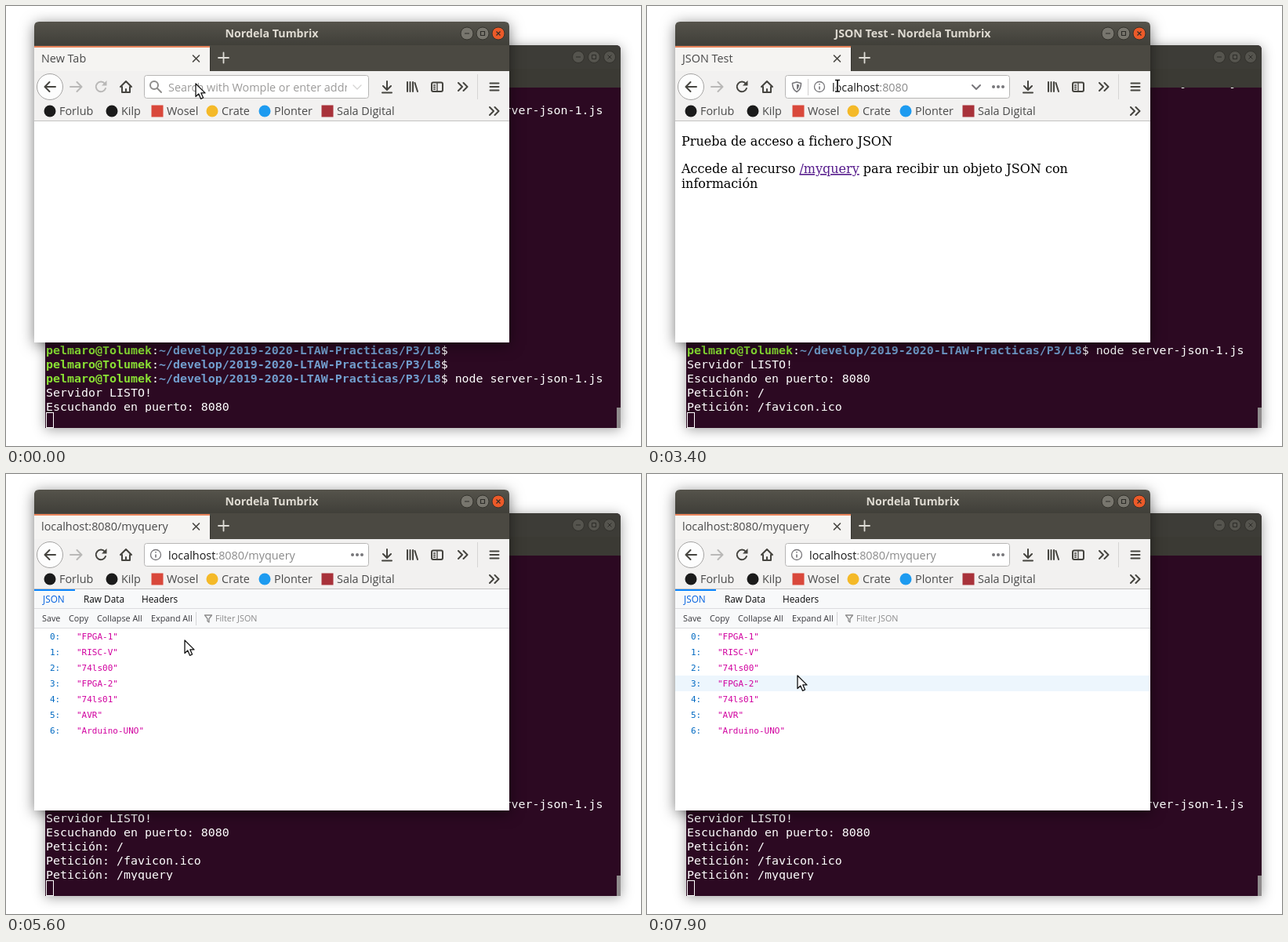
An HTML page for the animation above (8 s loop, 810 by 561 pixels).

```html
<!DOCTYPE html>
<html lang="es">
<head>
<meta charset="utf-8">
<title>JSON Test</title>
<style>
html, body { margin: 0; width: 100%; height: 100%; overflow: hidden; background: #fff; }
svg { display: block; width: 810px; height: 561px; }
text { white-space: pre; }
.ui { font: 14.4px "Open Sans", "Noto Sans", sans-serif; fill: #4a4a4a; }
.title { font: bold 14.2px "Open Sans", "Noto Sans", sans-serif; fill: #dfdbd2; text-anchor: middle; }
.term { font: 14.95px "DejaVu Sans Mono", monospace; fill: #fff; }
.user { font-weight: bold; fill: #8ae234; }
.path { font-weight: bold; fill: #729fcf; }
.page { font: 16px "DejaVu Serif", serif; fill: #000; }
.tabs { font: 11.8px "Open Sans", "Noto Sans", sans-serif; fill: #0c0c0d; }
.bar { font: 10.8px "Open Sans", "Noto Sans", sans-serif; fill: #38383d; }
.tree { font: 11px "DejaVu Sans Mono", monospace; }
.dim { fill: #8a8a8a; }
.dark { fill: #1a1a1a; }
.ic { fill: none; stroke: #45443f; stroke-width: 2; stroke-linecap: round; stroke-linejoin: round; }
.off { stroke: #b9b8b7; }
.thin { stroke-width: 1.3; }
</style>
</head>
<body>
<svg viewBox="0 0 810 561" xmlns="http://www.w3.org/2000/svg">
<defs>
  <linearGradient id="head" x2="0" y2="1">
    <stop offset="0" stop-color="#55534b"/><stop offset="1" stop-color="#403f39"/>
  </linearGradient>
  <linearGradient id="fade" x2="0" y2="1">
    <stop offset="0" stop-opacity=".22"/><stop offset="1" stop-opacity="0"/>
  </linearGradient>
  <clipPath id="termClip"><rect x="50" y="104" width="729" height="414"/></clipPath>
  <clipPath id="urlClip"><rect x="207" y="90" width="228" height="27"/></clipPath>
</defs>

<!-- terminal window -->
<path d="M50 538V56q0-6 6-6H778q6 0 6 6V538z" fill="#2c0922" style="filter:drop-shadow(0 2px 8px rgba(0,0,0,.38))"/>
<path d="M50 104V56q0-6 6-6H778q6 0 6 6V104z" fill="#3d3c37"/>
<rect x="50" y="80" width="734" height="24" fill="#3b3a34"/>
<g fill="#55544e" stroke="#33322d"><circle cx="730" cy="65" r="7.5"/><circle cx="750" cy="65" r="7.5"/><circle cx="770" cy="65" r="7.5"/></g>
<path d="M727 65h6M747.500 62.500h5v5h-5zM767.500 62.500l5 5m0-5l-5 5" fill="none" stroke="#2d2c28"/>
<g clip-path="url(#termClip)"><g id="lines" class="term"></g></g>
<rect x="51.500" y="518.500" width="9" height="19" fill="none" stroke="#fff"/>
<rect x="779" y="512" width="5" height="26" fill="#8f8b8c"/>

<!-- browser window -->
<path d="M36 429V26q0-6 6-6H636q6 0 6 6V429z" fill="#fff" style="filter:drop-shadow(0 3px 9px rgba(0,0,0,.5))"/>
<path d="M36 50V26q0-6 6-6H636q6 0 6 6V50z" fill="url(#head)"/>
<rect x="36" y="50" width="606" height="33" fill="#4b4942"/>
<rect x="36" y="83" width="606" height="63" fill="#f2f1f0"/>
<rect x="36" y="51" width="224" height="32" fill="#f5f4f2"/>
<rect x="36" y="51" width="224" height="2" fill="#e9855c"/>
<path d="M260.500 53V83" stroke="#34332e"/>
<path d="M36 146.500H642" stroke="#c3c2c1"/>
<g fill="#78766e" stroke="#34332d"><circle cx="588" cy="35" r="8"/><circle cx="608" cy="35" r="8"/><circle cx="628" cy="35" r="8" fill="#ec5a29"/></g>
<path d="M585 35h6M605.500 32.500h5v5h-5zM625.500 32.500l5 5m0-5l-5 5" fill="none" stroke="#2d2c28" stroke-width="1.2"/>
<text class="title" x="339" y="40" data-on="0-2500 5200-8000">Nordela Tumbrix</text>
<text class="title" x="339" y="40" data-on="2500-5200">JSON Test - Nordela Tumbrix</text>

<g class="ui">
  <text x="45" y="72" data-on="0-2500">New Tab</text>
  <text x="45" y="72" data-on="2500-5200">JSON Test</text>
  <g data-on="5200-5300"><circle cx="47" cy="67" r="2" fill="#77767a"/><text x="67" y="72">JSON Test</text></g>
  <text x="45" y="72" data-on="5300-8000">localhost:8080/myquery</text>
</g>
<path class="ic" style="stroke-width:1.6" d="M238.500 63l8 8m0-8l-8 8"/>
<path class="ic" style="stroke:#dedcd6;stroke-width:1.8" d="M271 66h13M277.500 59.500v13"/>

<!-- navigation bar -->
<circle cx="56" cy="103" r="16.500" fill="#fdfdfd" stroke="#a5a4a3"/>
<path class="ic" d="M63 103H50M55.500 97l-6 6 6 6"/>
<path class="ic off" d="M82 103h14M90.500 97l6 6-6 6"/>
<g id="reload"><path class="ic" d="M126 99A6.300 6.300 0 1 0 127 105"/><path d="M128.500 95v6.500h-6.500z"/></g>
<path class="ic" d="M146 103l7-7 7 7M148 103v7h10v-7M153 110v-4"/>
<rect id="box" x="176.500" y="88.500" width="286" height="29" rx="3" fill="#fff"/>
<g data-on="0-2400">
  <circle class="ic" cx="189" cy="101" r="5" style="stroke:#8d8c8a"/><path class="ic" d="M193 105l5 5" style="stroke:#8d8c8a"/>
</g>
<g class="ui">
  <text class="dim" x="207" y="109" clip-path="url(#urlClip)" style="fill:#9c9b9a" data-on="0-1300">Search with Womple or enter address</text>
  <g data-on="1300-2400">
    <rect x="210.500" y="95" width="99.500" height="17" fill="#ef8559"/>
    <text class="dark" x="207" y="109">l<tspan fill="#fff">ocalhost:8080/</tspan></text>
    <path class="ic" style="stroke:#77767a;stroke-width:1.6" d="M441 103h14M449.500 97.500l5.500 5.500-5.500 5.500"/>
  </g>
  <text class="dark" x="236" y="109" data-on="2400-5300">localhost<tspan class="dim">:8080</tspan></text>
  <text class="dark" x="207" y="109" data-on="5300-8000">localhost<tspan class="dim">:8080/myquery</tspan></text>
</g>
<path class="ic thin" style="stroke:#d5d4d3" d="M443 101l5 5 5-5" data-on="0-400"/>
<path class="ic thin" style="stroke:#77767a" d="M443 101l5 5 5-5" data-on="400-1300"/>
<path class="ic" style="stroke:#77767a" d="M415 101l5 5 5-5" data-on="2400-3600"/>
<g fill="#77767a" data-on="2400-8000"><circle cx="442" cy="103" r="2"/><circle cx="448" cy="103" r="2"/><circle cx="454" cy="103" r="2"/></g>
<g data-on="2400-5300">
  <path class="ic" style="stroke:#77767a;stroke-width:1.6" d="M191 97l5.500 1.500c0 6-2 9-5.500 11-3.500-2-5.500-5-5.500-11z"/>
  <path d="M191 99.500v7.500c2-1.500 3-3.500 3.200-6.500z" fill="#77767a"/>
  <path d="M205.500 93V114" stroke="#d0cfce"/>
</g>
<g id="info"><circle class="ic thin" cx="220" cy="103" r="6.500" style="stroke:#77767a"/><path d="M220 102.500v4M220 99v1.500" stroke="#77767a" stroke-width="1.600"/></g>
<path class="ic" d="M486 96v10M481 102l5 5 5-5M480 110.500h12M512 97v12M515.500 97v12M519 97v12M521.500 98l3.500 11M577 98l5 5-5 5M583.500 98l5 5-5 5M617.500 98.500h11M617.500 103h11M617.500 107.500h11M617 129l5 5-5 5M623.500 129l5 5-5 5" stroke-width="1.800"/>
<rect class="ic" x="543" y="97.500" width="14" height="11.500" rx="2"/>
<path class="ic thin" d="M550 98v11M545.500 101h2M545.500 103.500h2M545.500 106h2"/>
<path d="M601.500 87V119" stroke="#d6d5d4"/>

<g id="marks" class="ui"></g>

<!-- web page -->
<g class="page" data-on="2500-5300">
  <text x="44" y="178">Prueba de acceso a fichero JSON</text>
  <text x="44" y="213">Accede al recurso <tspan id="link" text-decoration="underline">/myquery</tspan> para recibir un objeto JSON con</text>
  <text x="44" y="232">información</text>
  <rect x="193.500" y="197.500" width="78" height="19" fill="none" stroke="#333" stroke-dasharray="1 1" data-on="5200-5300"/>
</g>
<g data-on="4300-5300">
  <path d="M36 407.500H202q3.500 0 3.500 3.500V429H36z" fill="#f2f1f0"/>
  <path d="M36 407.500H202q3.500 0 3.500 3.500V429" fill="none" stroke="#b9b8b7"/>
  <text class="ui" x="40" y="424">localhost:8080/myquery</text>
</g>

<!-- JSON viewer -->
<g data-on="5300-8000">
  <rect x="36" y="147" width="606" height="50" fill="#f8f9fa"/>
  <path d="M36 171.500H642M36 196.500H642" stroke="#dcdcdf"/>
  <rect x="36" y="147" width="52" height="2" fill="#0a84ff"/>
  <g class="tabs"><text x="47" y="164" style="fill:#0060df">JSON</text><text x="99" y="164">Raw Data</text><text x="173" y="164">Headers</text></g>
  <g class="bar"><text x="46" y="188">Save</text><text x="80" y="188">Copy</text><text x="116" y="188">Collapse All</text><text x="185" y="188">Expand All</text><text class="dim" x="267" y="188">Filter JSON</text></g>
  <path d="M242.500 176V193" stroke="#d4d4d7"/>
  <path class="ic thin" style="stroke:#8a8a8a" d="M253.500 180h9l-3.500 4.500v4.500l-2-1.500v-3z"/>
  <rect id="hover" x="36" width="606" height="20" fill="#edf6fd"/>
  <g id="tree" class="tree"></g>
</g>

<!-- address suggestions -->
<g data-on="1300-2400">
  <rect x="36" y="292" width="606" height="13" fill="url(#fade)"/>
  <rect x="36" y="123" width="606" height="169" fill="#fff"/>
  <path d="M36 123.500H642M36 162.500H642M36 291.500H642" stroke="#c6c5c4"/>
  <rect x="40" y="128" width="598" height="30" rx="2" fill="#ef8559"/>
  <g fill="none" stroke="#fff" stroke-width="1.400"><circle cx="191" cy="144" r="7"/><ellipse cx="191" cy="144" rx="3.200" ry="7"/><path d="M184 144h14M185.500 140h11M185.500 148h11"/></g>
  <text class="ui" x="207" y="149" style="fill:#fff"><tspan font-weight="bold">l</tspan>oca<tspan font-weight="bold">l</tspan>host:8080</text>
  <text class="ui" x="317" y="149" style="fill:#fff">— <tspan x="338" font-size="12.500">Visit</tspan></text>
  <text class="ui" x="183" y="201" style="fill:#7c7b7a">This time, search with:</text>
  <g id="engines"></g>
  <g class="ic" style="stroke:#77767a"><circle cx="447" cy="259" r="4.500"/><circle cx="447" cy="259" r="7" stroke-dasharray="1 4.500" stroke-width="2.500"/></g>
</g>

<!-- pointers -->
<g id="pointer" fill="#fff" stroke="#111" stroke-linejoin="round" stroke-width="1.300">
  <path id="arrow" d="M0 0V16.500L3.800 13 6.500 19.300 9.600 18 6.900 11.900H12z"/>
  <g id="beam"><path fill="none" stroke="#fff" stroke-width="3.600" d="M-2.500-6.500H4.500M-2.500 8H4.500M1-6.500V8"/><path fill="none" stroke-width="1.700" d="M-2-6.500H4M-2 8H4M1-6.500V8"/></g>
  <g id="hand"><path d="M-1.500 8V1.500q0-2 1.500-2t1.500 2V6L7 7.200q1.800.6 1.700 2.300L8 15H-2.500L-6 9.500q-.5-1.800 1.500-1.700L-1.500 10z"/><path stroke-width="1" d="M0 11v1M2.700 11v1M5.300 11v1M-2 15h9.500"/></g>
</g>
</svg>
<script>
const LOOP = 8000, STEP = 100;
const $ = id => document.getElementById(id);

// terminal text, one entry per row from its first baseline
const prompt = '<tspan class="user">pelmaro@Tolumek</tspan>:<tspan class="path">~/develop/2019-2020-LTAW-Practicas/P3/L8</tspan>$ ';
const run = prompt + 'node server-json-1.js';
const rows = [[138, run], ...[prompt, prompt, run, 'Servidor LISTO!', 'Escuchando en puerto: 8080',
  'Petición: /', 'Petición: /favicon.ico', 'Petición: /myquery'].map((s, i) => [444 + 18 * i, s])];
$('lines').innerHTML = rows.map(([y, s]) => `<text x="51" y="${y}">${s}</text>`).join('');

const dot = (x, y, c) => `<circle cx="${x}" cy="${y}" r="7.5" fill="${c}"/>`;
const square = (x, y, c) => `<rect x="${x - 7.5}" y="${y - 7.5}" width="15" height="15" fill="${c}"/>`;

const marks = [
  [56, 'Forlub', '#1b1b1b', dot], [135, 'Kilp', '#1b1b1b', dot], [193, 'Wosel', '#d9483b', square],
  [263, 'Crate', '#f4b928', dot], [330, 'Plonter', '#1d9bf0', dot], [410, 'Sala Digital', '#a8323a', square]
];
$('marks').innerHTML = marks.map(([x, s, c, mark]) =>
  mark(x, 134, c) + `<text x="${x + 12}" y="139">${s}</text>`).join('');

const engines = ['#4285f4', '#0c8484', '#222222', '#c7254e', '#de5833', '#d9483b', '#1d9bf0', '#222222'];
$('engines').innerHTML = engines.map((c, i) =>
  (i === 1 ? square : dot)(191 + 40 * (i % 5), i < 5 ? 227 : 259, c)).join('');

const items = ['FPGA-1', 'RISC-V', '74ls00', 'FPGA-2', '74ls01', 'AVR', 'Arduino-UNO'];
$('tree').innerHTML = items.map((s, i) =>
  `<text x="56" y="${211 + 20 * i}" fill="#0069c2">${i}:<tspan x="90" fill="#d1009f">"${s}"</tspan></text>`).join('');

// pointer path: time, x, y
const path = [
  [0, 242, 99], [300, 242, 99], [400, 242, 101], [3400, 242, 101], [3700, 244, 132], [4000, 250, 176],
  [4200, 254, 196], [4400, 250, 206], [4700, 238, 212], [5100, 228, 212], [5700, 228, 212],
  [5800, 230, 228], [5900, 231, 241], [6100, 231, 241], [6200, 231, 245], [6300, 231, 245],
  [6400, 232, 249], [6600, 180, 212], [6900, 50, 189], [7000, 50, 189], [7100, 46, 236],
  [7200, 45, 289], [7300, 45, 324], [7500, 62, 331], [7700, 140, 290], [7900, 192, 257]
];
function pointerAt(t) {
  const i = path.findIndex(p => p[0] > t);
  if (i < 0) return path[path.length - 1].slice(1);
  const [a, b] = [path[i - 1], path[i]];
  const k = (t - a[0]) / (b[0] - a[0]);
  return [a[1] + (b[1] - a[1]) * k, a[2] + (b[2] - a[2]) * k];
}

const timed = [...document.querySelectorAll('[data-on]')].map(el =>
  [el, el.dataset.on.split(' ').map(s => s.split('-').map(Number))]);
const show = (el, on) => { el.style.display = on ? '' : 'none'; };

function draw(t) {
  for (const [el, spans] of timed) show(el, spans.some(([a, b]) => t >= a && t < b));

  const scroll = [2500, 2700, 5300].filter(s => t >= s).length;
  $('lines').setAttribute('transform', `translate(0 ${-18 * scroll})`);

  const focus = t >= 600 && t < 2400;
  $('box').setAttribute('stroke', focus ? '#ea8257' : '#b7b6b5');
  const tone = t < 2400 ? '#b9b8b7' : '#45443f';
  $('reload').firstChild.style.stroke = tone;
  $('reload').setAttribute('fill', tone);
  show($('info'), t >= 2400);
  $('info').setAttribute('transform', t < 5300 ? '' : 'translate(-29 0)');
  $('link').setAttribute('fill', t < 5200 ? '#551a8b' : '#d01f1f');

  const [x, y] = pointerAt(t).map(Math.round);
  $('pointer').setAttribute('transform', `translate(${x} ${y})`);
  const beam = t >= 400 && y < 118;
  const hand = t >= 4300 && t < 5300;
  show($('beam'), beam);
  show($('hand'), hand);
  show($('arrow'), !beam && !hand);

  const row = Math.floor((y - 197) / 20);
  show($('hover'), t >= 5800 && row >= 0 && row < items.length);
  $('hover').setAttribute('y', 197 + 20 * row);
}

function tick() {
  draw(Math.floor(performance.now() % LOOP / STEP) * STEP);
  requestAnimationFrame(tick);
}
tick();
</script>
</body>
</html>
```
